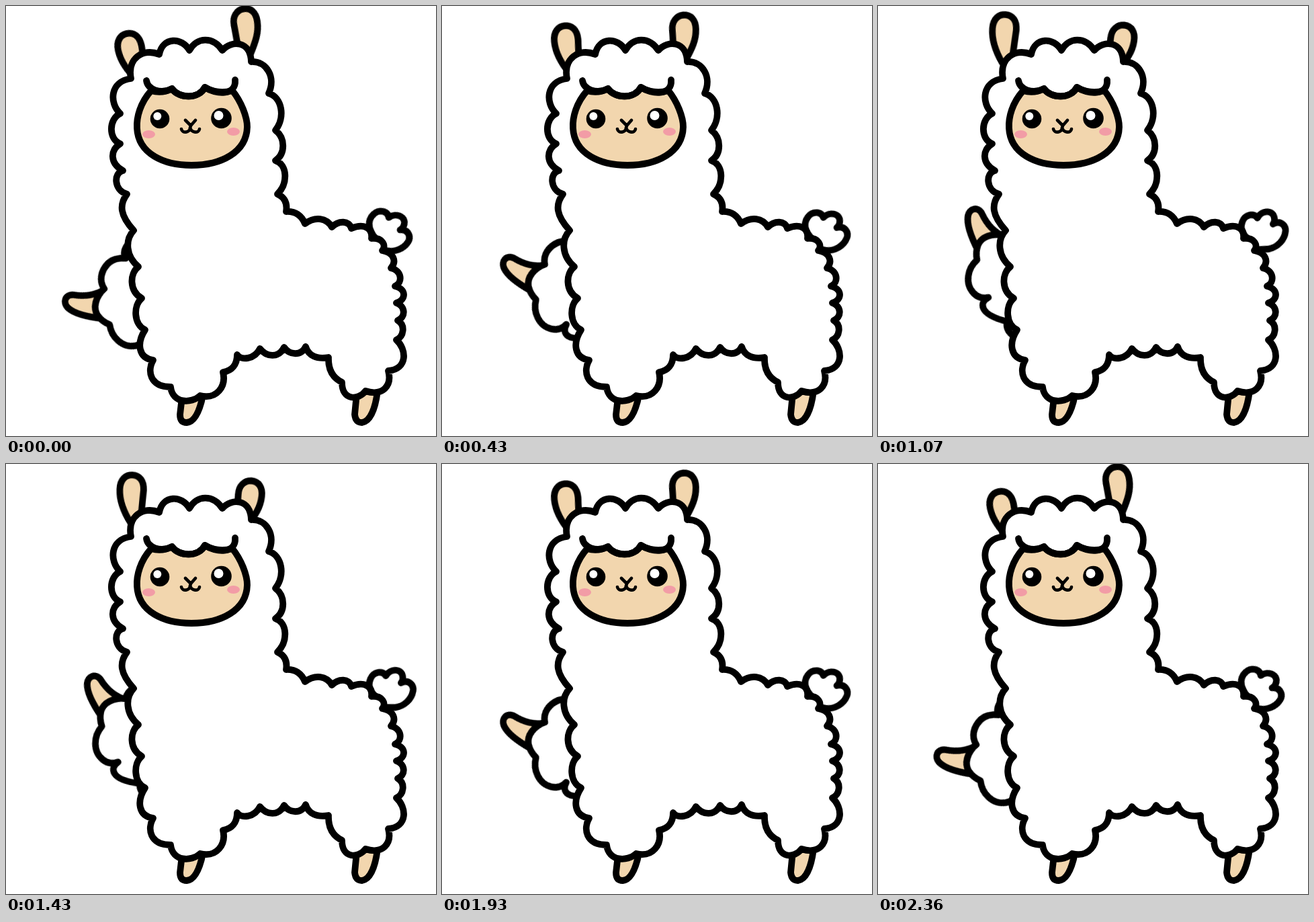
An HTML page for the animation above (2.43 s loop, 640 by 640 pixels).

```html
<!DOCTYPE html>
<html lang="en">
<head>
<meta charset="utf-8">
<title>Waving alpaca</title>
<style>
  html, body { margin: 0; width: 100%; height: 100%; overflow: hidden; background: #fff; }
  svg { display: block; width: 100%; height: 100%; }

  .line { stroke: #000; stroke-width: 9.8; stroke-linecap: round; stroke-linejoin: round; }
  .wool { fill: #fff; }
  .skin { fill: #f2d6ae; }
  .bare { fill: none; }
  .thin { stroke-width: 4.7; }
  .blush { fill: #f29ca6; }

  /* 34 poses per loop: 17 out, 17 back */
  .ears, .tail, .arm { animation: sway 2430ms -4ms infinite; }
  .ears { --from: -12.5deg; --to: 5.7deg; transform-origin: 279px 61px; }
  .tail { --from: 19deg; --to: -9deg; transform-origin: 568.7px 326px; }
  .arm { animation-name: wave; transform-origin: 240.5px 419.7px; }

  @keyframes sway {
    0% { transform: rotate(var(--from)); animation-timing-function: steps(16); }
    47.059% { transform: rotate(var(--to)); animation-timing-function: steps(1); }
    50% { transform: rotate(var(--to)); animation-timing-function: steps(16); }
    97.059%, 100% { transform: rotate(var(--from)); animation-timing-function: steps(1); }
  }
  @keyframes wave {
    0% { transform: rotate(-42.3deg); animation-timing-function: steps(16); }
    47.059% { transform: rotate(17.9deg); animation-timing-function: steps(1); }
    50% { transform: rotate(17.9deg); animation-timing-function: steps(10); }
    79.412% { transform: rotate(-19.6deg); animation-timing-function: steps(6); }
    97.059% { transform: rotate(-40.4deg); animation-timing-function: steps(1); }
    100% { transform: rotate(-42.3deg); }
  }
</style>
</head>
<body>
<svg viewBox="0 0 640 640">
  <g class="line">
    <g class="ears skin">
      <path d="M187 92C176 76 168.5 58 168.5 42C168.5 27 177 20 186 20C197 20 204 28 204 42L202 75"/>
      <path d="M344 70L345 43C345 29 354 21.5 363.5 21.5C375 22 381 31 380 44C379 60 372 72 358 92"/>
    </g>

    <path class="tail wool" d="M556 350C540 340 538 327 543 318C548 308 561 306 566 315
      C574 304 592 305 591 320Q591 324 588 327C600 322 607 332 605 340C602 353 590 362 577 363L562 362"/>

    <g class="arm">
      <path class="skin" d="M170 358C150 355 138 343 130 333C122 324 110 330 111 342C112 355 124 372 138 388"/>
      <path class="wool" d="M240 332Q227 334 224 345C215 335 207 333 200 333C184 334 172 343 170 357
        C152 357 138 367 136 380C135 390 137 396 140 402C129 418 131 441 147 451Q158 458 170 452
        C159 462 161 480 206 480Q206 492 219 498"/>
    </g>

    <g class="skin">
      <path d="M262 582L259 608C259 617 263 620 269 620C282 619 289 599 293 580"/>
      <path d="M522 577L519 608C520 617 524 620 530 620C543 618 550 597 553 573"/>
    </g>

    <path class="wool" d="M228 72C233 46 262 46 273 66C284 46 308 45 322 66C336 50 364 52 365 83
      C388 82 402 106 391 130C411 136 416 166 401 185C416 196 416 220 401 230C419 236 420 264 404 280
      Q420 287 417 306Q437 305 445 324C460 313 477 315 485 329C495 319 511 319 514 331
      C530 324 546 328 544 346C559 344 567 356 560 364C577 367 582 380 573 390
      C589 394 591 411 579 417C596 421 596 437 581 442C595 447 595 463 583 468C595 475 592 492 581 497
      C596 510 599 540 569 543C575 566 560 581 535 573C525 587 500 588 500 560Q479 550 480 523
      C462 526 450 520 446 507C440 521 422 520 414 508C406 524 388 523 378 510C370 526 350 528 344 519
      C344 534 336 543 323 545C328 566 314 586 289 580C276 592 248 592 245 567C214 567 210 543 219 527
      C197 524 194 502 207 482C190 474 189 446 202 435C183 424 184 398 197 388C178 372 177 348 190 334
      C170 312 168 296 180 280C160 274 160 248 174 245C154 234 155 214 170 205C152 198 153 168 170 160
      C153 144 155 112 186 108C180 78 204 62 228 72Z"/>

    <path class="skin" d="M216 126Q232 131 247 123C257 138 287 139 296 121Q315 132 337 126
      C350 142 359 165 359 180C358 218 320 237 276 237C235 237 197 220 195 182C194 165 200 144 216 126Z"/>
    <path class="bare" d="M209 111C211 124 230 132 247 123C257 138 287 139 296 121C312 132 343 134 341 110"/>
    <path class="bare thin" d="M267 170L275 178L282 170M275 178L274 182M261 183C262 190 274 189 274 181C276 189 287 190 288 183"/>
  </g>

  <circle cx="229" cy="168" r="14.3"/>
  <circle cx="320.5" cy="167" r="15.3"/>
  <circle class="wool" cx="225.3" cy="164" r="6"/>
  <circle class="wool" cx="316.5" cy="163" r="7"/>
  <ellipse class="blush" cx="212.5" cy="191" rx="9.5" ry="6"/>
  <ellipse class="blush" cx="338.5" cy="187" rx="9.5" ry="6"/>
</svg>
</body>
</html>
```
